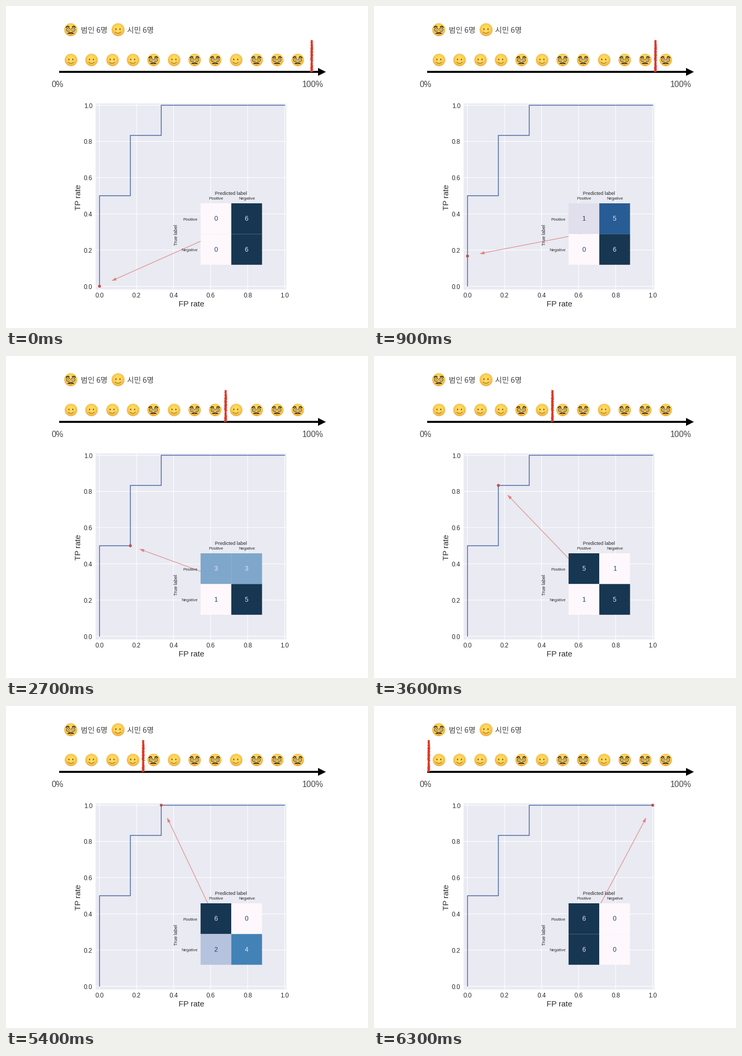
Write a matplotlib script that moves like this. It is 688 px wide and 612 px high and loops after 7.2 s.

```python
import numpy as np
import matplotlib.pyplot as plt
from matplotlib.animation import FuncAnimation
from matplotlib.colors import LinearSegmentedColormap
from matplotlib.patches import Circle, Ellipse, PathPatch, Polygon, Rectangle
from matplotlib.path import Path

W, H, DPI = 688, 612, 64
PT = 72 / DPI  # points per pixel

LINEUP = "ccccpcppcppp"  # c: citizen, p: culprit
CUTS = [12, 11, 9, 8, 6, 5, 4, 0]  # people left of the threshold
FIRST_X, STEP = 123.3, 39.17
INK = "#2a2a2a"
BLUES = LinearSegmentedColormap.from_list("blues", [
    "#fef8fd", "#e1dfec", "#b6c3de", "#80a7cb", "#4382b6", "#285c95", "#173652"])

fig = plt.figure(figsize=(W / DPI, H / DPI), dpi=DPI, facecolor="white")
ax = fig.add_axes([0, 0, 1, 1])
ax.axis("off")


def label(x, y, s, size, ha="center", color=INK, font="Liberation Sans", rot=0, z=6):
    """Text whose capitals are centred on y (on x when rotated)."""
    drop = 0.358 * size
    x, y = (x + drop, y) if rot else (x, y + drop)
    return ax.text(x, y, s, fontsize=size * PT, ha=ha, va="baseline", color=color,
                   family=font, rotation=rot, rotation_mode="anchor", zorder=z)


def stroke(xs, ys, color, width, z=3, **kw):
    return ax.plot(xs, ys, color=color, lw=width * PT, zorder=z, snap=False, **kw)[0]


def box(x, y, w, h, color, z):
    return ax.add_patch(Rectangle((x, y), w, h, fc=color, ec="none", zorder=z, snap=False))


def curve(points, color, width=0, fill=False):
    codes = [Path.MOVETO] + [Path.CURVE3] * (len(points) - 1)
    ax.add_patch(PathPatch(Path(points, codes), fc=color if fill else "none",
                           ec=color, lw=width * PT, capstyle="round", zorder=5))


# Faces
def disc(x, y, r):
    v, u = np.mgrid[-1:1:96j, -1:1:96j] * 1.05
    edge = np.hypot(u, v)
    t = np.clip(np.hypot(u, v + 0.12) / 1.1, 0, 1)[..., None] ** 3
    img = np.ones((96, 96, 4))
    img[..., :3] = (1 - t) * np.array([255, 220, 96]) / 255 + t * np.array([236, 164, 50]) / 255
    img[..., 3] = np.clip((1 - edge) * r + 0.5, 0, 1)
    q = r * 1.05
    ax.imshow(img, extent=(x - q, x + q, y + q, y - q), aspect="auto", zorder=4)


def citizen(x, y, r):
    disc(x, y, r)
    for side in (-1, 1):
        ax.add_patch(Ellipse((x + side * 0.32 * r, y - 0.14 * r), 0.18 * r, 0.28 * r,
                             fc="#7a4c14", ec="none", zorder=5))
    curve([(x - 0.46 * r, y + 0.3 * r), (x, y + 0.74 * r), (x + 0.46 * r, y + 0.3 * r)],
          "#8f5c16", 0.95)


def culprit(x, y, r):
    disc(x, y, r)

    def at(side, points):
        return [(x + side * u * r, y + v * r) for u, v in points]

    for side in (-1, 1):
        curve(at(side, [(0.26, -0.5), (0.5, -0.72), (0.72, -0.42)]), "#2a1d18", 1.8)
        eye = at(side, [(0.38, -0.06)])[0]
        ax.add_patch(Circle(eye, 0.28 * r, fc="#fbdf8c", ec="#2f2620", lw=0.95 * PT, zorder=5))
        ax.add_patch(Ellipse(eye, 0.14 * r, 0.22 * r, fc="#6b451a", ec="none", zorder=5))
    ax.add_patch(Ellipse((x, y + 0.14 * r), 0.32 * r, 0.5 * r,
                         fc="#f9c24a", ec="#dd9a30", lw=0.4 * PT, zorder=5))
    for side in (-1, 1):
        curve(at(side, [(0, 0.4), (0.28, 0.3), (0.52, 0.54), (0.26, 0.66), (0, 0.52)]),
              "#2a1d18", 0.2, fill=True)
    curve(at(1, [(-0.14, 0.74), (0, 0.78), (0.14, 0.74)]), "#a8701e", 0.7)


culprit(123, 45.7, 12)
citizen(212.8, 45.7, 12)
for x, s in ((142, "범인 6명"), (230.5, "시민 6명")):
    label(x, 46, s, 14.4, "left", "#464646", "Noto Sans CJK JP")
for i, kind in enumerate(LINEUP):
    (citizen if kind == "c" else culprit)(FIRST_X + STEP * i, 103.2, 11.5)

# Probability axis
stroke([101, 596], [125.2, 125.2], "black", 3.7, solid_capstyle="butt")
ax.add_patch(Polygon([(593, 117.7), (608, 125.2), (593, 132.7)], fc="black", ec="none", zorder=3))
label(98, 148.3, "0%", 15.7, color="#464646")
label(582.5, 148.3, "100%", 15.7, color="#464646")


# Curve plot
def px(fp, tp):
    return 177.7 + 352 * fp, 532.6 - 344 * tp


box(170.3, 185.2, 362.5, 353.5, "#e9eaf2", 1)
for v in np.linspace(0, 1, 6):
    gx, gy = px(v, v)
    stroke([gx, gx], [185.2, 538.7], "white", 1.2, 2, solid_capstyle="butt")
    stroke([170.3, 532.8], [gy, gy], "white", 1.2, 2, solid_capstyle="butt")
    label(gx, 550.3, f"{v:.1f}", 11.7)
    label(164.3, gy + 0.8, f"{v:.1f}", 11.7, "right")
label(352, 566, "FP rate", 15)
label(137, 363.5, "TP rate", 15, rot=90)
roc = [(0, 0), (0, 1 / 2), (1 / 6, 1 / 2), (1 / 6, 5 / 6), (1 / 3, 5 / 6), (1 / 3, 1), (1, 1)]
stroke(*zip(*(px(*p) for p in roc)), "#4a69a9", 1.5, solid_joinstyle="miter")

# Confusion matrix
SIDE = 58.4
label(428, 356, "Predicted label", 9.1)
label(322.8, 435, "True label", 9, rot=90)
for i, s in enumerate(("Positive", "Negative")):
    label(399 + 58.7 * i, 365.4, s, 7.9)
    label(364, 405.1 + SIDE * i, s, 7.9, "right")
cells, counts = [], []
for k in range(4):
    cx, cy = 369.8 + SIDE * (k % 2), 375 + SIDE * (k // 2)
    cells.append(box(cx, cy, SIDE, SIDE, "white", 5))
    counts.append(label(cx + 29, cy + 29, "", 12.2))

# Moving parts
rng = np.random.default_rng(4)
mark_y = np.linspace(65.5, 124.8, 75)
mark_x = np.where(np.arange(75) % 2, 1.5, -1.5) + rng.uniform(-0.7, 0.7, 75)
mark = stroke(mark_x, mark_y, "#dd3a28", 1.9, 7)
dot = ax.add_patch(Circle((0, 0), 2.8, fc="#c0504d", ec="none", zorder=4))
shaft = stroke([], [], "#e29490", 1.3, 3.5)
head = ax.add_patch(Polygon(np.zeros((3, 2)), fc="#e3817b", ec="none", zorder=3.6))

ax.set_xlim(0, W)
ax.set_ylim(H, 0)


def update(frame):
    cut = CUTS[frame]
    flagged = LINEUP[cut:]
    tp, fp = flagged.count("p"), flagged.count("c")
    mark.set_xdata(mark_x + (581 if cut == 12 else 104 + STEP * cut))

    point = np.array(px(fp / 6, tp / 6))
    dot.center = tuple(point)
    base = np.array([406, 431 if point[1] > 431 else 422.5])
    tip = point + 0.1 * (base - point)
    back = (base - point) / np.hypot(*(base - point))
    neck = tip + 9.5 * back
    side = 3 * np.array([-back[1], back[0]])
    shaft.set_data(*zip(base, neck))
    head.set_xy([tip, neck + side, neck - side])

    values = np.array([tp, 6 - tp, fp, 6 - fp])
    levels = (values - values.min()) / np.ptp(values)
    for cell, text, value, level in zip(cells, counts, values, levels):
        cell.set_facecolor(BLUES(level))
        text.set_text(str(value))
        text.set_color("#ebe6f0" if level >= 0.5 else "#25406a")
    return [mark, dot, shaft, head, *cells, *counts]


anim = FuncAnimation(fig, update, frames=len(CUTS), interval=900, repeat=True, repeat_delay=0)
plt.show()
```
